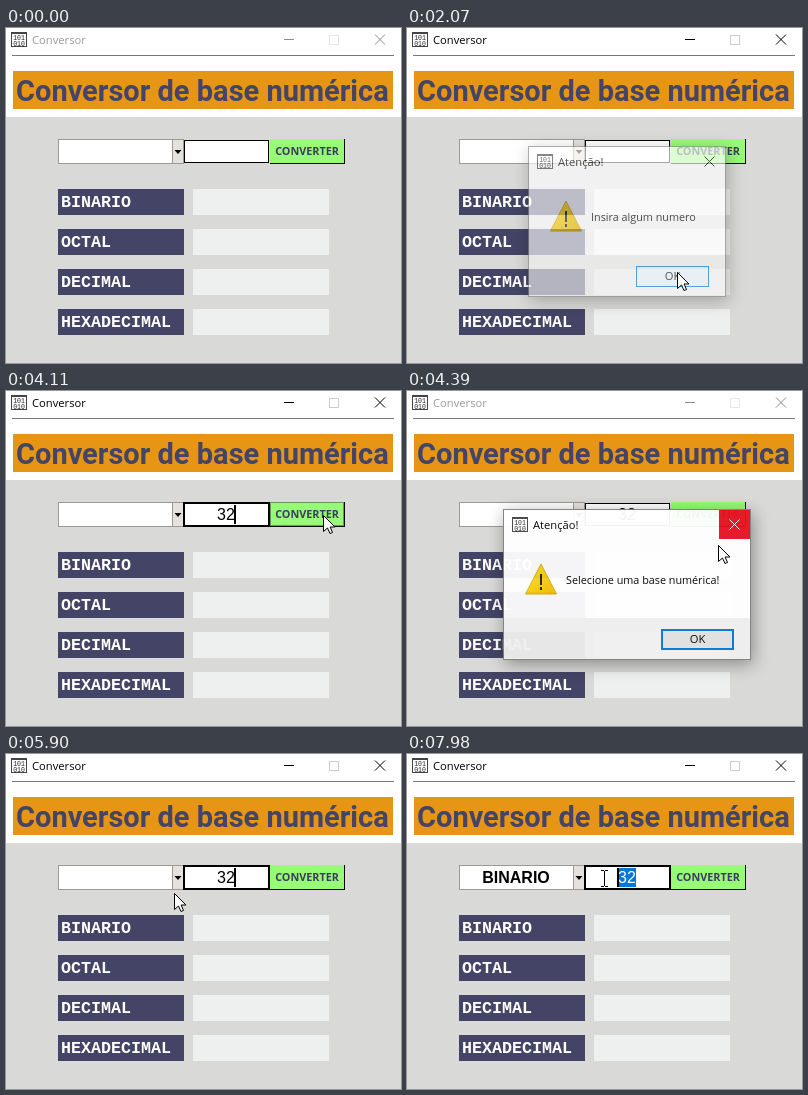
Recreate the animation shown at these times as an HTML page with a canvas. Size 395 by 335 pixels, loop 8 s.

```html
<!DOCTYPE html>
<html lang="pt">
<head>
<meta charset="utf-8">
<title>Conversor</title>
<style>
html, body { margin: 0; width: 100%; height: 100%; overflow: hidden; background: #fff; }
canvas { display: block; width: 395px; height: 335px; }
</style>
</head>
<body>
<canvas id="stage" width="395" height="335"></canvas>
<script>
const W = 395, H = 335, LOOP = 8000, STEP = 70, PHASE = 50;
const stage = document.getElementById('stage').getContext('2d');
const layer = document.createElement('canvas');
layer.width = W;
layer.height = H;
let g = stage;

const UI = '"Open Sans", "Noto Sans", sans-serif';
const ARIAL = '"Liberation Sans", Arial, sans-serif';
const MONO = '"Liberation Mono", "Courier New", monospace';
const HEAD = 'Roboto, "Liberation Sans", sans-serif';
const NAVY = '#444466', BLUE = '#0078d7', GREEN = '#98fb78';
const BASES = ['BINARIO', 'OCTAL', 'DECIMAL', 'HEXADECIMAL'];

// Moments of the story, in ms
const AT = { enter: 120, activate: 1030, focus: 2680, typing: 3340, list: 6180, pick: 7180, drag: 7690 };

// Pointer glides: start, end, destination
const ENTRANCE = { x: 357, y: 330 };
const GLIDES = [
  { from: 120, to: 900, x: 291, y: 126 },
  { from: 1240, to: 1730, x: 272, y: 247 },
  { from: 1960, to: 2500, x: 209, y: 127 },
  { from: 3410, to: 3780, x: 317, y: 124 },
  { from: 4160, to: 4880, x: 294, y: 247 },
  { from: 5440, to: 5860, x: 168, y: 139 },
  { from: 5900, to: 6070, x: 167, y: 123 },
  { from: 6370, to: 6650, x: 133, y: 162 },
  { from: 6650, to: 6930, x: 109, y: 153 },
  { from: 7180, to: 7620, x: 232, y: 124 },
  { from: 7690, to: 7910, x: 197, y: 124 }
];

const DIALOGS = [
  { x: 122, w: 196, text: 'Insira algum numero', open: 1100, cool: 1380, press: 1800, close: 1940 },
  { x: 97, w: 246, text: 'Selecione uma base numérica!', open: 4157, cool: 4390, press: 5020, close: 5440 }
];

const clamp = v => Math.max(0, Math.min(1, v));
const ramp = (t, from, to) => clamp((t - from) / (to - from));
const smooth = k => k * k * (3 - 2 * k);
const within = (t, a, b) => t >= a && t < b;
const inside = (p, x, y, w, h) => within(p.x, x, x + w) && within(p.y, y, y + h);

function box(x, y, w, h, color) {
  g.fillStyle = color;
  g.fillRect(x, y, w, h);
}

function frame(x, y, w, h, color, line = 1) {
  g.strokeStyle = color;
  g.lineWidth = line;
  g.strokeRect(x + line / 2, y + line / 2, w - line, h - line);
}

function shape(points, fill, stroke) {
  g.beginPath();
  points.forEach(([x, y]) => g.lineTo(x, y));
  g.closePath();
  g.fillStyle = fill;
  g.fill();
  if (!stroke) return;
  g.strokeStyle = stroke;
  g.lineWidth = 1;
  g.stroke();
}

function label(text, x, y, font, color, align = 'left') {
  g.font = font;
  g.fillStyle = color;
  g.textAlign = align;
  g.fillText(text, x, y);
}

function cross(x, y, size, color) {
  g.strokeStyle = color;
  g.lineWidth = 1;
  g.beginPath();
  g.moveTo(x, y);
  g.lineTo(x + size, y + size);
  g.moveTo(x + size, y);
  g.lineTo(x, y + size);
  g.stroke();
}

function pointerAt(t) {
  const p = { ...ENTRANCE };
  for (const m of GLIDES) {
    const k = smooth(ramp(t, m.from, m.to));
    p.x += (m.x - p.x) * k;
    p.y += (m.y - p.y) * k;
  }
  return { x: Math.round(p.x), y: Math.round(p.y) };
}

function appIcon(x, y) {
  frame(x, y, 16, 15, '#444');
  box(x, y, 16, 2, '#444');
  label('101', x + 8, y + 8, '6.5px ' + MONO, '#222', 'center');
  label('010', x + 8, y + 14, '6.5px ' + MONO, '#222', 'center');
}

function titleBar(active) {
  const ink = active ? '#000' : '#8c8c8c';
  appIcon(5, 4);
  label('Conversor', 26, 16, '11.2px ' + UI, active ? '#000' : '#999');
  box(278, 11, 10, 1, ink);
  frame(323, 7, 10, 10, active ? '#ccc' : '#e6e6e6');
  cross(369, 6.5, 10, ink);
  box(6, 27, 382, 1, '#777');
}

function heading() {
  box(7, 43, 380, 38, '#e69514');
  label('Conversor de base numérica', 10, 73, 'bold 29px ' + HEAD, NAVY);
}

function results() {
  box(0, 89, W, H - 89, '#d9d9d8');
  BASES.forEach((name, i) => {
    const y = 161 + i * 40;
    box(52, y, 126, 26, NAVY);
    box(187, y, 136, 26, '#eef0ef');
    label(name, 55, y + 18, 'bold 16.67px ' + MONO, '#fff');
  });
}

function comboBox(value) {
  box(52, 111, 126, 25, '#9e9a91');
  box(53, 112, 113, 23, '#fff');
  box(167, 112, 10, 23, '#e4e2de');
  shape([[168.5, 122], [175.5, 122], [172, 126]], '#000');
  label(value, 109, 129, 'bold 16px ' + ARIAL, '#000', 'center');
}

// The value is centred; `selected` counts characters from its right end.
function entry(value, focused, caret, selected) {
  const font = '16px ' + ARIAL, mid = 220, digit = 9;
  const right = mid + value.length * digit / 2, left = right - selected * digit;
  box(178, 112, 85, 23, '#fff');
  if (focused) frame(177, 111, 87, 25, '#000', 2);
  else frame(178, 112, 85, 23, '#000');
  label(value, mid, 129, font, '#000', 'center');
  if (selected) {
    g.save();
    g.beginPath();
    g.rect(left, 114, right - left, 19);
    g.clip();
    box(left, 114, right - left, 19, BLUE);
    label(value, mid, 129, font, '#fff', 'center');
    g.restore();
  }
  if (caret) box(Math.floor(left) - 1, 114, 2, 19, '#000');
}

function convertButton(hover) {
  box(264, 111, 75, 25, '#000');
  box(264, 111, 74, 24, hover ? '#5f9f4b' : GREEN);
  box(265, 112, 72, 22, GREEN);
  label('CONVERTER', 301, 127, 'bold 10.8px ' + UI, '#3c3c5c', 'center');
}

function dropList(active) {
  box(52, 136, 128, 68, '#777');
  box(53, 137, 126, 66, '#fff');
  BASES.forEach((name, i) => {
    const y = 138 + i * 16;
    if (i === active) box(54, y, 125, 16, BLUE);
    label(name, 54, y + 12, '11.7px ' + UI, i === active ? '#fff' : '#000');
  });
}

function warning(x, y) {
  const fill = g.createLinearGradient(x, y, x + 32, y + 32);
  fill.addColorStop(0, '#ffe622');
  fill.addColorStop(1, '#f0b800');
  shape([[x + 16, y + 1], [x + 31.5, y + 31], [x + 0.5, y + 31]], fill, '#d9ae1c');
  box(x + 15, y + 11, 2, 11, '#222');
  box(x + 15, y + 24, 2, 3, '#222');
}

function okButton(x, y, pressed, hover) {
  box(x, y, 73, 21, pressed ? '#cce4f7' : hover ? '#e5f1fb' : '#e1e1e1');
  frame(x, y, 73, 21, pressed ? '#005499' : BLUE, pressed || hover ? 1 : 2);
  label('OK', x + 36.5, y + 14, '11.2px ' + UI, '#000', 'center');
}

function dialog(d, t, pointer) {
  const shown = 1 - (1 - ramp(t, d.open, d.open + 300)) ** 2;
  const alpha = shown * (1 - ramp(t, d.close, d.close + 200));
  if (alpha <= 0) return;
  const y = 119, h = 149, right = d.x + d.w;

  g = layer.getContext('2d');
  g.clearRect(0, 0, W, H);
  g.save();
  g.shadowColor = 'rgba(0,0,0,.38)';
  g.shadowBlur = 16;
  g.shadowOffsetX = 2;
  g.shadowOffsetY = 4;
  box(d.x - 1, y - 1, d.w + 2, h + 2, '#808080');
  g.restore();
  box(d.x, y, d.w, h, '#fff');
  box(d.x, 227, d.w, y + h - 227, '#f0f0f0');

  const heat = 1 - ramp(t, d.cool, d.cool + 200);
  box(right - 31, y, 31, 29, `rgba(232,17,35,${heat})`);
  cross(right - 20.5, y + 9.5, 10, heat > 0.5 ? '#fff' : '#000');
  appIcon(d.x + 8, 126);
  label('Atenção!', d.x + 29, 138, '11.2px ' + UI, '#000');
  warning(d.x + 21, 172);
  label(d.text, d.x + 62, 193, '10.8px ' + UI, '#000');
  okButton(right - 89, 238, within(t, d.press, d.close), inside(pointer, right - 89, 238, 73, 21));

  g = stage;
  g.globalAlpha = alpha;
  g.drawImage(layer, 0, 0);
  g.globalAlpha = 1;
}

function arrow({ x, y }) {
  const outline = [[0, 0], [0, 16], [4, 12.5], [6.5, 18], [9, 17], [6.6, 11.5], [11.5, 11.5]];
  shape(outline.map(([dx, dy]) => [x + dx + 0.5, y + dy + 0.5]), '#fff', '#000');
}

function iBeam({ x, y }) {
  box(x, y - 7, 1, 15, '#000');
  for (const dy of [-8, 8]) {
    box(x - 3, y + dy, 3, 1, '#000');
    box(x + 1, y + dy, 3, 1, '#000');
  }
}

function draw(t) {
  const pointer = pointerAt(t);
  const modal = DIALOGS.some(d => within(t, d.open, d.close));
  const typed = '32'.slice(0, Math.max(0, Math.floor((t - AT.typing) / STEP) + 1));
  const focused = !modal && (within(t, AT.focus, AT.list) || t >= AT.drag);
  const selected = t < AT.drag ? 0 : pointer.x < 215 ? 2 : pointer.x < 224 ? 1 : 0;

  box(0, 0, W, H, '#fff');
  titleBar(t >= AT.activate && !modal);
  heading();
  results();
  comboBox(t >= AT.pick ? BASES[0] : '');
  entry(typed, focused, focused && t >= AT.focus + STEP / 3, selected);
  convertButton(!modal && inside(pointer, 264, 111, 75, 25));
  if (within(t, AT.list, AT.pick)) dropList(Math.floor((pointer.y - 138) / 16));
  DIALOGS.forEach(d => dialog(d, t, pointer));

  if (t < AT.enter) return;
  const overEntry = !modal && inside(pointer, 179, 113, 84, 22);
  (overEntry ? iBeam : arrow)(pointer);
}

function tick() {
  const t = performance.now() % LOOP;
  draw(PHASE + Math.floor((t - PHASE + 1) / STEP) * STEP);
  requestAnimationFrame(tick);
}
tick();
</script>
</body>
</html>
```
